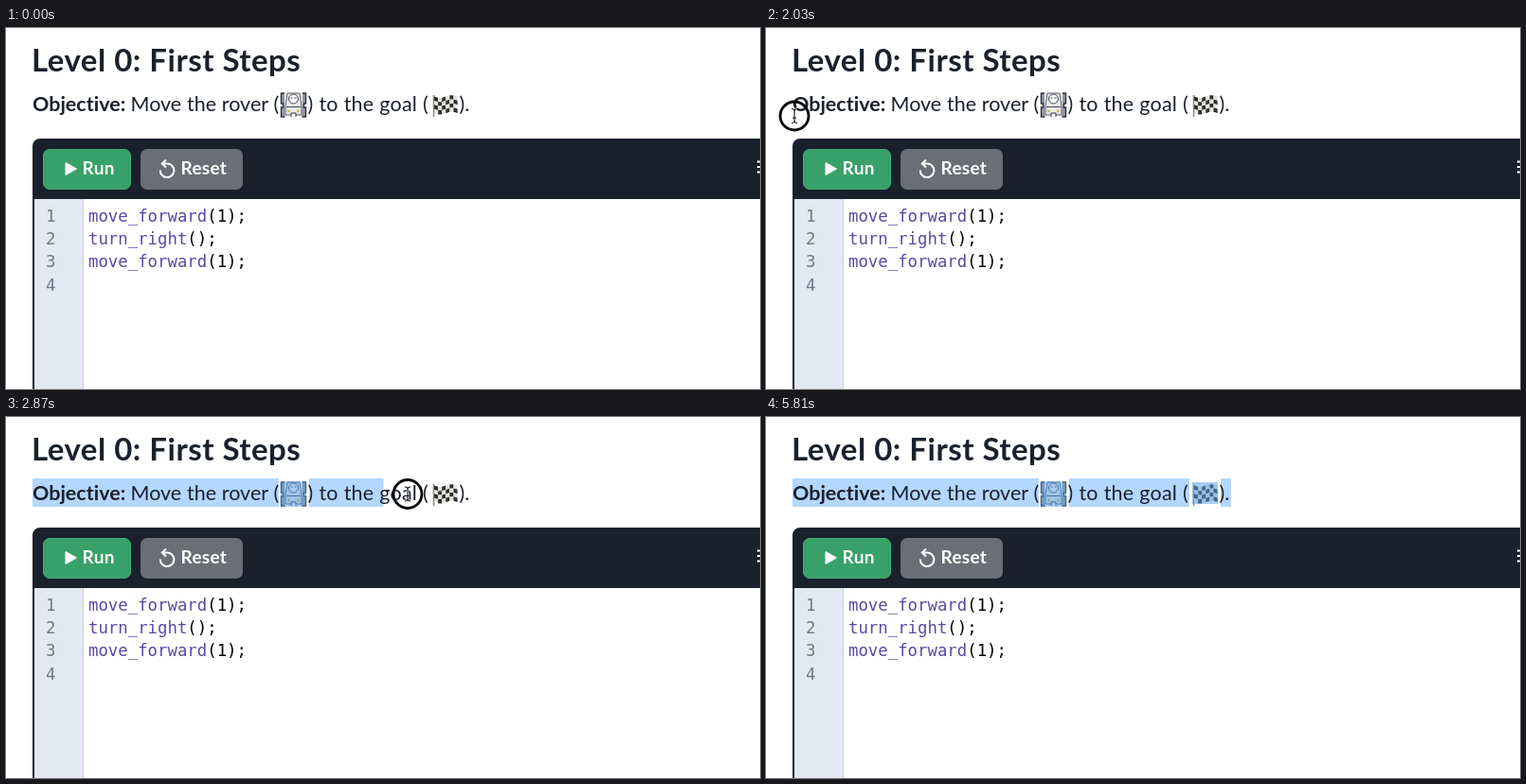
An HTML page that plays this animation: 796 px wide and 382 px high, repeating every 6370 ms.

```html
<!DOCTYPE html>
<html lang="en">
<head>
<meta charset="utf-8">
<title>Level 0</title>
<style>
  html, body { margin: 0; width: 100%; height: 100%; overflow: hidden; background: #fff; }
  svg { display: block; width: 796px; height: 382px; }
  text { font-family: Nunito, Lato, "Open Sans", sans-serif; font-variant-ligatures: none; fill: #1a202c; white-space: pre; }
  .title { font-size: 33px; font-weight: 700; letter-spacing: .5px; }
  .goal { font-size: 21.5px; word-spacing: .3px; }
  .bold { font-weight: 700; }
  .button { font-size: 19px; font-weight: 700; letter-spacing: .3px; fill: #fff; }
  .code text { font: 17.33px "DejaVu Sans Mono", "Liberation Mono", monospace; fill: #000; }
  .code .num { fill: #717988; }
  .code .fn { fill: #5b48a6; }
</style>
</head>
<body>
<svg viewBox="0 0 796 382">
  <g id="marks" fill="#b3d7ff"></g>

  <text class="title" x="27" y="45.5">Level 0: First Steps</text>
  <g class="goal">
    <text class="bold" x="28" y="87.5">Objective:</text>
    <text x="131.5" y="87.5">Move the rover (</text>
    <text x="318.5" y="87.5" letter-spacing=".2">) to the goal (</text>
    <text x="478.5" y="87.5">).</text>
  </g>

  <!-- rover -->
  <g stroke="#30333c">
    <path d="M294 69h-3.5v11h2v4h-2v10h4M313 69h3.5v11h-2v4h2v10h-4" fill="#9298a2" stroke-width="1.4"/>
    <path d="M297 69h13l2 14v9h-17v-9Z" fill="#e9eaec" stroke-width=".8"/>
    <circle cx="303.5" cy="75" r="5" fill="#f7f7f5" stroke-width=".9"/>
    <path d="M300.5 74h2m2 0h2M296 83.5h15" fill="none" stroke-width=".9"/>
    <path d="M297 88h3m7 0h3" stroke="#d8bd55" stroke-width="2.5"/>
    <path d="M301 94v-4h5v4" fill="#fff" stroke-width="1"/>
  </g>

  <!-- chequered flag -->
  <path d="M451.500 71V94" stroke="#8b8580" stroke-width="1.5"/>
  <g id="flag"></g>

  <rect id="roverTint" x="290" y="68" width="27" height="27" fill="#549fea" opacity=".5"/>
  <rect id="flagTint" x="450" y="69" width="27" height="23" fill="#549fea" opacity=".5"/>

  <!-- editor -->
  <path d="M28 382V125a8 8 0 0 1 8-8H796V181H30V382Z" fill="#1a202c"/>
  <rect x="30" y="181" width="51" height="201" fill="#e3e8f2"/>
  <path d="M81.5 181V382" stroke="#cdd1d8"/>
  <rect x="39.5" y="128.5" width="92" height="42" rx="6.5" fill="#38a169" stroke="#45aa74"/>
  <rect x="142" y="128" width="108" height="43" rx="7" fill="#6b6e77"/>
  <path d="M63 142.5 74.5 149 63 155.500Z" fill="#fff" stroke="#fff" stroke-linejoin="round"/>
  <text class="button" x="80.5" y="155">Run</text>
  <path d="M162.8 150.500a7.300 7.300 0 1 0 7.300-7h-5M169 139.500l-4.200 4 4.200 4" fill="none" stroke="#fff" stroke-width="2"/>
  <text class="button" x="184.5" y="155">Reset</text>
  <path d="M793 141.500h3m-3 5.500h3m-3 5.500h3" stroke="#fff" stroke-width="2"/>
  <g class="code" id="code"></g>
  <path id="caret" d="M86 260V284" stroke="#000"/>

  <!-- pointer, hot spot at 0,0 -->
  <g id="pointer">
    <circle id="ring" fill="none" stroke="#000" stroke-width="2.8"/>
    <path id="arrow" d="M0 0V13.500L3 10.700 5.200 15.800 7.600 14.800 5.400 9.800H9.600Z" fill="#000" stroke="#fff" stroke-width="1.2" paint-order="stroke"/>
    <g id="beam" fill="none">
      <path id="beamLine" d="M-3-7.500Q0-7.500 0-5Q0-7.500 3-7.500M0-5V5M-3 7.500Q0 7.500 0 5Q0 7.500 3 7.500M-2 2H2" stroke="#fff" stroke-width="2.6"/>
      <path d="M-3-7.500Q0-7.500 0-5Q0-7.500 3-7.500M0-5V5M-3 7.500Q0 7.500 0 5Q0 7.500 3 7.500M-2 2H2" stroke="#111" stroke-width="1.1"/>
    </g>
  </g>
</svg>
<script>
const LOOP = 6370, STEP = 70;
const $ = id => document.getElementById(id);
const show = (id, on) => $(id).setAttribute("visibility", on ? "visible" : "hidden");

$("code").innerHTML = ["move_forward(1);", "turn_right();", "move_forward(1);", ""].map((line, i) => {
  const y = 205 + i * 24.2;
  const [, name, rest] = line.match(/^(\w*)(.*)$/);
  return `<text class="num" x="42" y="${y}">${i + 1}</text>
    <text x="87" y="${y}"><tspan class="fn">${name}</tspan>${rest}</text>`;
}).join("");

// Checks on a gently waving cloth
const wave = x => 1.5 * Math.sin((x - 452) / 25 * Math.PI * 2);
let cloth = "";
for (let col = 0; col < 6; col++) for (let row = 0; row < 4; row++) {
  const x = 452 + col * 4.1, y = 72.5 + row * 4.4, a = y + wave(x), b = y + wave(x + 4.1);
  cloth += `<path d="M${x} ${a}L${x + 4.1} ${b}v4.4L${x} ${a + 4.4}Z" fill="${(col + row) % 2 ? "#e3e3df" : "#30302f"}"/>`;
}
$("flag").innerHTML = cloth;

// Selectable runs of text: left and right edge
const runs = [[28, 288], [320, 447], [480, 491]];
$("marks").innerHTML = runs.map(([x]) => `<rect x="${x}" y="65" height="30"/>`).join("");
const marks = [...$("marks").children];

// Pointer path: time, x, y
const path = [
  [700, 62, 312], [910, 56, 235], [1120, 43, 146], [1330, 34.5, 106],
  [1680, 29, 93], [2030, 30, 93], [2100, 50, 92], [2240, 127, 90],
  [2310, 160, 89], [2520, 304, 85], [2590, 342, 84], [2660, 356, 84],
  [2730, 373, 83], [3010, 475, 80], [3150, 503, 78], [5390, 503, 78],
  [5460, 501, 92], [5530, 490, 145], [5670, 442, 300], [5740, 403, 368], [5810, 390, 400]
];

function pointerAt(t) {
  const i = path.findIndex(p => p[0] > t);
  if (i < 0) return path[path.length - 1].slice(1);
  if (i === 0) return path[0].slice(1);
  const [t0, x0, y0] = path[i - 1], [t1, x1, y1] = path[i];
  const k = (t - t0) / (t1 - t0);
  return [x0 + (x1 - x0) * k, y0 + (y1 - y0) * k];
}

function draw() {
  const t = Math.floor(performance.now() % LOOP / STEP) * STEP;
  const [x, y] = pointerAt(t);

  // The selection trails the pointer by one step
  const end = t <= 2030 ? 0 : t >= 3150 ? 503 : pointerAt(t - STEP)[0];
  runs.forEach(([a, b], i) => marks[i].setAttribute("width", Math.max(0, Math.min(end, b) - a)));
  show("roverTint", end > 303);
  show("flagTint", end > 463);
  show("caret", t >= 980 && t < 1540);

  const visible = t >= 700 && t < 5810;
  const beam = t >= 1820 && t < 3150 && x < 492;
  $("pointer").setAttribute("transform", `translate(${x} ${y})`);
  $("ring").setAttribute("r", t < 3150 ? 15 : 20);
  show("ring", t >= 1820 && t < 4550);
  show("beam", visible && beam);
  show("arrow", visible && !beam);
  requestAnimationFrame(draw);
}
draw();
</script>
</body>
</html>
```
